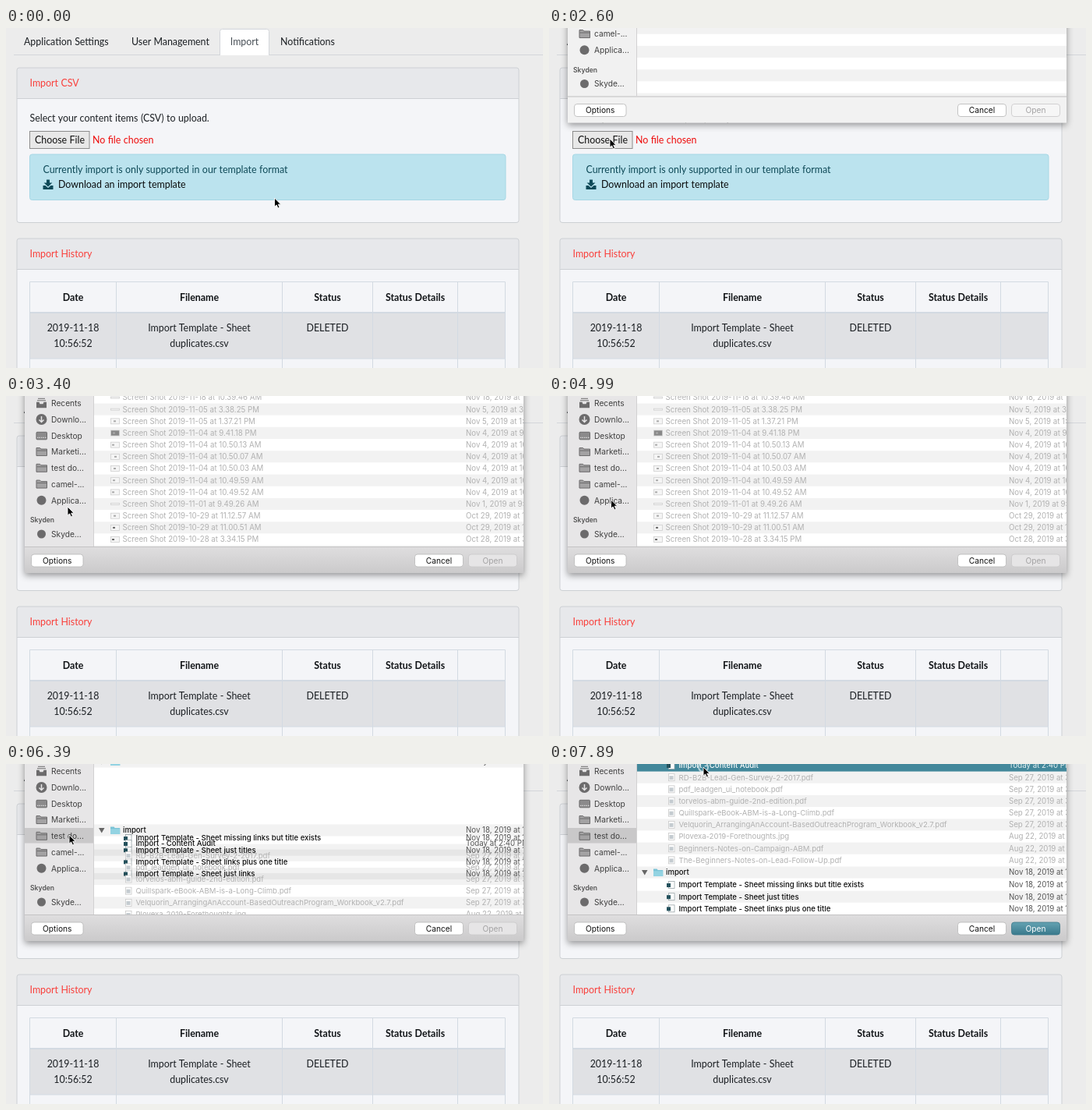
Write an HTML page that moves like this. It is 689x436 px and loops after 7990 ms.

```html
<!DOCTYPE html>
<html lang="en">
<head>
<meta charset="utf-8">
<title>CSV import</title>
<style>
  html, body { margin: 0; width: 100%; height: 100%; overflow: hidden; background: #ececec; }
  svg { display: block; width: 689px; height: 436px; }
  text { white-space: pre; }
  .page { font: 12.4px Lato, "Open Sans", sans-serif; word-spacing: .3px; }
  .mac { font: 10.2px Inter, Roboto, sans-serif; }
  .list { font-size: 9.55px; }
  .list .shots, .list .date { font-size: 9.7px; }
  #sheetBack { filter: drop-shadow(0 3px 4px rgba(0, 0, 0, .4)); }
</style>
</head>
<body>
<svg id="stage" viewBox="0 0 689 436">
  <defs>
    <clipPath id="listClip"><rect x="113" y="-300" width="551" height="493"/></clipPath>
    <linearGradient id="bar" x2="0" y2="1"><stop stop-color="#dfdedf"/><stop offset="1" stop-color="#cbcacb"/></linearGradient>
    <linearGradient id="teal" x2="0" y2="1"><stop stop-color="#64a2b2"/><stop offset="1" stop-color="#39798c"/></linearGradient>
  </defs>
</svg>
<script>
const LOOP = 7990, ROW = 15.17;
const stage = document.getElementById('stage');

function el(tag, attrs, parent = stage, content) {
  const node = document.createElementNS('http://www.w3.org/2000/svg', tag);
  set(node, attrs);
  if (content) node.textContent = content;
  return parent.appendChild(node);
}
function set(node, attrs) {
  for (const key in attrs) node.setAttribute(key, attrs[key]);
}
const box = (p, x, y, width, height, fill, more) =>
  el('rect', { x, y, width, height, fill, ...more }, p);
const line = (p, d, stroke, more) =>
  el('path', { d, stroke, fill: 'none', ...more }, p);
const label = (p, x, y, str, fill, more) =>
  el('text', { x, y, fill, ...more }, p, str);
const show = (node, on) => set(node, { visibility: on ? 'visible' : 'hidden' });
const shift = (node, x, y) => set(node, { transform: `translate(${x} ${y})` });

// ---------- Web page ----------
const page = el('g', { class: 'page' });
const ink = '#1b1f23', red = '#f9403c', edge = '#cdd0d4';
const mid = { 'text-anchor': 'middle' };

box(page, 0, 0, 689, 436, '#ececec');
line(page, 'M10 34.5H689', '#d3d6da');
line(page, 'M274.5 35V4.5q0-3 3-3H334.5q3 0 3 3V35', '#d3d6da', { fill: '#fff' });
label(page, 23, 22, 'Application Settings', ink);
label(page, 161, 22, 'User Management', ink);
label(page, 306, 22, 'Import', '#495057', mid);
label(page, 352, 22, 'Notifications', ink);

function card(y, h, title) {
  box(page, 14, y, 644, h, '#f4f5f8', { rx: 3 });
  box(page, 14, y, 644, 39.5, '#e7e8eb', { rx: 3 });
  line(page, `M14 ${y + 39.5}H658`, edge);
  box(page, 14, y, 644, h, 'none', { rx: 3, stroke: edge });
  label(page, 30.5, y + 24, title, red);
}
card(51, 198.5, 'Import CSV');
card(270, 190, 'Import History');

label(page, 30.5, 120, 'Select your content items (CSV) to upload.', ink);
box(page, 30.5, 132.5, 76.5, 22, '#e8e8e8', { stroke: '#8c8c8c' });
label(page, 69, 147.5, 'Choose File', '#111', mid);
label(page, 111, 147.5, 'No file chosen', '#ee0a0a');

box(page, 30.5, 162, 610.5, 58.5, '#bbe3ee', { rx: 3, stroke: '#a6d7e5' });
label(page, 47.5, 186, 'Currently import is only supported in our template format', '#0f4a58');
label(page, 67, 205, 'Download an import template', '#0b0d0e');
el('path', { d: 'M52 194.5h4v4h3.4l-5.4 5-5.4-5h3.4zM47.5 202h3l3.5 3 3.5-3h3v5h-13z', fill: '#0f4a58' }, page);

// Table
const cols = [30.5, 141.5, 354.5, 470.5, 579.5, 640.5];
const center = i => (cols[i] + cols[i + 1]) / 2;
box(page, 30.5, 365, 610, 59, '#e0e1e4');
for (const x of cols) line(page, `M${x} 325.5V436`, '#d3dae2');
line(page, 'M30.5 325.5H640.5M30.5 424H640.5', '#d3dae2');
line(page, 'M30.5 365H640.5', '#d3dae2', { 'stroke-width': 2 });
['Date', 'Filename', 'Status', 'Status Details'].forEach((s, i) =>
  label(page, center(i), 350, s, '#111417', { ...mid, 'font-weight': 700 }));
label(page, center(0), 389, '2019-11-18', ink, mid);
label(page, center(0), 408.5, '10:56:52', ink, mid);
label(page, center(1), 389, 'Import Template - Sheet', ink, mid);
label(page, center(1), 408.5, 'duplicates.csv', ink, mid);
label(page, center(2), 389, 'DELETED', ink, mid);

// ---------- File dialog ----------
const sheet = el('g', { class: 'mac' });
box(sheet, 24, -300, 640, 527, '#d4d3d4', { id: 'sheetBack' });
box(sheet, 113, -300, 551, 493, '#fff');
const sidebar = box(sheet, 24, -300, 88.5, 493, '#e7e6e7');
const picked = box(sheet, 24, 82, 88.5, 19.5, '#c9c8c9');
line(sheet, 'M112.5 -300V193', '#d2d1d2');

const list = el('g', { class: 'list', 'clip-path': 'url(#listClip)' }, sheet);
const shade = 'rgba(0,0,0,.05)';

function stripes(start) {
  const g = el('g', {}, list);
  for (let y = start; y < 193; y += 2 * ROW) box(g, 113, y, 551, ROW, shade);
  return g;
}
const emptyList = stripes(7);
const fullList = stripes(9.5);

function fileIcon(g, y, black) {
  box(g, 153.5, y - 4.5, 7.5, 9, '#fff', { stroke: black ? '#9aa5a8' : '#c9c9c9', 'stroke-width': .8 });
  box(g, black ? 151 : 154.5, y - 2, 5, 5, black ? '#24515c' : '#c4cbd0');
}
function row(g, y, name, date, kind, gray) {
  const black = kind !== 'off' && kind !== 'shot';
  const x = { shot: 149.5, folder: 150 }[kind] || 166.5;
  const fill = black ? '#0c0c0c' : '#b1b1b1';
  const weight = { 'font-weight': black ? 500 : 400 };
  if (gray) box(g, 113, y - ROW / 2, 551, ROW, shade);
  if (kind === 'folder') {
    el('path', { d: `M119 ${y - 3}h7.5l-3.75 6.5z`, fill: '#666' }, g);
    el('path', { d: `M134 ${y - 4.5}h4.5l1.2 1.5h6.5v8H134z`, fill: '#79c3d6' }, g);
    box(g, 134, y - 1.8, 12.2, 6.8, '#93d3e2');
  } else if (kind !== 'shot') fileIcon(g, y, black);
  const title = label(g, x, y + 3.4, name, fill, weight);
  const when = label(g, 590, y + 3.4, date, black ? '#555' : '#b1b1b1', { class: 'date' });
  return [title, when];
}

// Screenshots folder
const shots = el('g', { class: 'shots' }, list);
[['11-18', '10.39.46 AM'], ['11-05', '3.38.25 PM'], ['11-05', '1.37.21 PM'], ['11-04', '9.41.18 PM'],
 ['11-04', '10.50.13 AM'], ['11-04', '10.50.07 AM'], ['11-04', '10.50.03 AM'], ['11-04', '10.49.59 AM'],
 ['11-04', '10.49.52 AM'], ['11-01', '9.49.26 AM'], ['10-29', '11.12.57 AM'], ['10-29', '11.00.51 AM'],
 ['10-28', '3.34.15 PM']].forEach(([day, time], i) => {
  const y = 2 + i * ROW;
  const [m, d] = day.split('-');
  const date = `${m === '11' ? 'Nov' : 'Oct'} ${+d}, 2019 at ${time.replace('.', ':')}`;
  const flat = [0, 1, 9].includes(i);
  box(shots, 134.5, y - (flat ? 1 : 3.5), 11, flat ? 2 : 7, i === 3 ? '#888' : '#f5f5f5', { stroke: '#cfcfcf', 'stroke-width': .8 });
  if (!flat) box(shots, 136 + (i * 3) % 4, y - 1, 3, 2, i > 10 ? '#666' : '#aaa');
  row(shots, y, `Screen Shot 2019-${day} at ${time}`, date, 'shot');
});

// Documents folder
const docs = el('g', {}, list);
const demo = el('g', {}, docs);
const sheets = el('g', {}, docs);
const folder = el('g', {}, docs);
const kids = el('g', {}, docs);
row(demo, 0, 'demo', 'Today at 2:40 PM', 'folder', true);
row(folder, 0, 'import', 'Nov 18, 2019 at 11:02 AM', 'folder', true);
['missing links but title exists', 'just titles', 'links plus one title', 'just links'].forEach((s, i) =>
  row(sheets, i * ROW, 'Import Template - Sheet ' + s, 'Nov 18, 2019 at 10:58 AM', 'on', i % 2));

const bar = box(kids, 113, 2 - ROW / 2, 551, ROW, '#43889b');
const audit = row(kids, 2, 'Import - Content Audit', 'Today at 2:40 PM', 'on');
['RD-B2B-Lead-Gen-Survey-2-2017.pdf', 'pdf_leadgen_ui_notebook.pdf', 'torvelos-abm-guide-2nd-edition.pdf',
 'Quillspark-eBook-ABM-is-a-Long-Climb.pdf',
 'Velquorin_ArrangingAnAccount-BasedOutreachProgram_Workbook_v2.7.pdf',
 'Plovexa-2019-Forethoughts.jpg', 'Beginners-Notes-on-Campaign-ABM.pdf',
 'The-Beginners-Notes-on-Lead-Follow-Up.pdf'].forEach((s, i) =>
  row(kids, 2 + (i + 1) * ROW, s, (i < 5 ? 'Sep 27' : 'Aug 22') + ', 2019 at 3:15 PM', 'off', i % 2 === 0));

// Sidebar
const side = '#3f3f3f', icon = '#6c6b6c';
['Recents', 'Downlo...', 'Desktop', 'Marketi...', 'test do...', 'camel-...', 'Applica...'].forEach((s, i) => {
  const y = 9.3 + i * 20.75;
  label(sheet, 58, y + 3.7, s, side);
  if (i === 0) {
    line(sheet, `M41 ${y - 6}h9M40 ${y - 3.5}h11`, icon);
    el('path', { d: `M39 ${y - 1.5}h3.5l1 2.5h4l1-2.5H52v7.5H39z`, fill: icon }, sheet);
  } else if (i === 1) {
    el('circle', { cx: 45.5, cy: y, r: 7, fill: icon }, sheet);
    line(sheet, `M45.5 ${y - 4}v7M42.5 ${y + .5}l3 3 3-3`, '#e7e6e7', { 'stroke-width': 1.5 });
  } else if (i === 2) {
    box(sheet, 39, y - 4.5, 13.5, 9.5, '#8b8a8b', { rx: 1, stroke: icon });
    line(sheet, `M40 ${y + 2.5}h12`, '#e7e6e7', { 'stroke-dasharray': '1.5 1' });
  } else if (i < 6) {
    el('path', { d: `M39 ${y + 5}v-10h4.5l1.5 1.5h7.5v8.5z`, fill: '#a3a2a3', stroke: icon }, sheet);
    line(sheet, `M39.5 ${y - 1.5}h12.5`, icon);
  } else el('circle', { cx: 45.5, cy: y, r: 6, fill: icon }, sheet);
});
label(sheet, 31, 162.2, 'Skyden', '#555', { 'font-size': 8.6, 'font-weight': 600 });
label(sheet, 58, 180.7, 'Skyde...', side);
el('circle', { cx: 45.5, cy: 177, r: 5.5, fill: icon }, sheet);

// Bottom bar
const footer = box(sheet, 24, 193, 640, 34, 'url(#bar)');
line(sheet, 'M24 193.5H664', '#c4c3c4');
function button(x, w, str) {
  const face = box(sheet, x, 203, w, 16, '#fff', { rx: 3.5, stroke: '#b7b6b7', 'stroke-width': .8 });
  return [face, label(sheet, x + w / 2, 214.7, str, '#111', mid)];
}
button(32.5, 66.5, 'Options');
button(524.5, 62, 'Cancel');
const [openFace, openText] = button(593.5, 62, 'Open');

// ---------- Pointer ----------
const ring = el('circle', { r: 7, fill: 'none', 'stroke-width': 2 });
const pointer = el('path', {
  d: 'M0 0V11.2L2.6 8.9 4.5 13 6.5 12.1 4.7 8.2H8.2Z',
  fill: '#000', stroke: '#fff', 'stroke-width': .9
});

// ---------- Timeline: [time, values...] held until the next entry ----------
const path = [
  [0, 344.5, 218], [990, 325, 212], [1090, 250, 187], [1190, 165, 160], [1290, 139, 152.5],
  [1500, 130, 152], [1600, 112, 151], [1700, 96, 149.5], [1800, 85, 147.5], [1900, 80, 144],
  [2000, 78, 142], [3300, 78.5, 142], [3400, 79, 142],
  [4990, 79.5, 133], [5090, 80.5, 112], [5190, 81, 96], [5290, 81, 91],
  [6790, 84, 89], [6890, 95, 81], [6990, 113, 68], [7090, 136, 50],
  [7190, 160, 32], [7290, 181, 17], [7390, 193, 8], [7490, 198, 4]
];
const drop = [[0, -400], [2300, -214], [2400, -188], [2500, -150], [2600, -105.5], [2700, -42], [2800, 0]];
// demo y, folder y, gap to first sheet, offset of the opened files, their opacity
const unfold = [
  [0, 5, 20, ROW, 200, 0], [6290, 2, 48, 12, 140, .4], [6390, -3, 85, 10, 100, 1],
  [6490, -10, 122, 13, 35, 1], [6590, -13, 139, 16, 0, 1]
];
// radius, opacity
const click = [
  [0, 0, 0], [2000, 4, .5], [2100, 7, .5], [2200, 8, .25], [2300, 0, 0],
  [5490, 4, .5], [5590, 7, .5], [5690, 8, .25], [5790, 0, 0],
  [7590, 3, .8], [7690, 5, .8], [7790, 6, .8], [7890, 6, .7]
];
function at(table, t) {
  let found = table[0];
  for (const step of table) if (step[0] <= t) found = step;
  return found.slice(1);
}

function draw(t) {
  const [x, y] = at(path, t);
  shift(pointer, x, y);
  const [r, alpha] = at(click, t);
  const chosen = t >= 7590;
  set(ring, { cx: x, cy: y, r, opacity: alpha, stroke: chosen ? '#e6f3f6' : '#777' });

  // The dialog is pale until it gets focus, when its files appear
  const active = t >= 3000;
  shift(sheet, 0, at(drop, t)[0]);
  show(sheet, t >= 2300);
  set(sidebar, { fill: active ? '#e7e6e7' : '#f1f1f1' });
  set(footer, { fill: active ? 'url(#bar)' : '#f2f2f2' });
  show(emptyList, t >= 2300 && !active);
  show(fullList, active && t < 6290);
  show(shots, active && t < 5590);
  show(picked, t >= 5490);
  set(docs, { display: t >= 5690 ? 'inline' : 'none' });

  const [demoY, folderY, gap, offset, opacity] = at(unfold, t);
  shift(demo, 0, demoY);
  shift(folder, 0, folderY);
  shift(sheets, 0, folderY + gap);
  shift(kids, 0, offset);
  set(kids, { opacity });

  set(bar, { opacity: chosen ? 1 : 0 });
  set(audit[0], { fill: chosen ? '#fff' : '#0c0c0c' });
  set(audit[1], { fill: chosen ? '#e4f0f3' : '#555' });
  set(openFace, {
    fill: chosen ? 'url(#teal)' : active ? '#e6e5e6' : '#f6f6f6',
    stroke: chosen ? '#3a7688' : '#c9c8c9'
  });
  set(openText, { fill: chosen ? '#fff' : '#a3a2a3' });
}

const begin = performance.now();
function tick() {
  draw((performance.now() - begin) % LOOP);
  requestAnimationFrame(tick);
}
tick();
</script>
</body>
</html>
```
